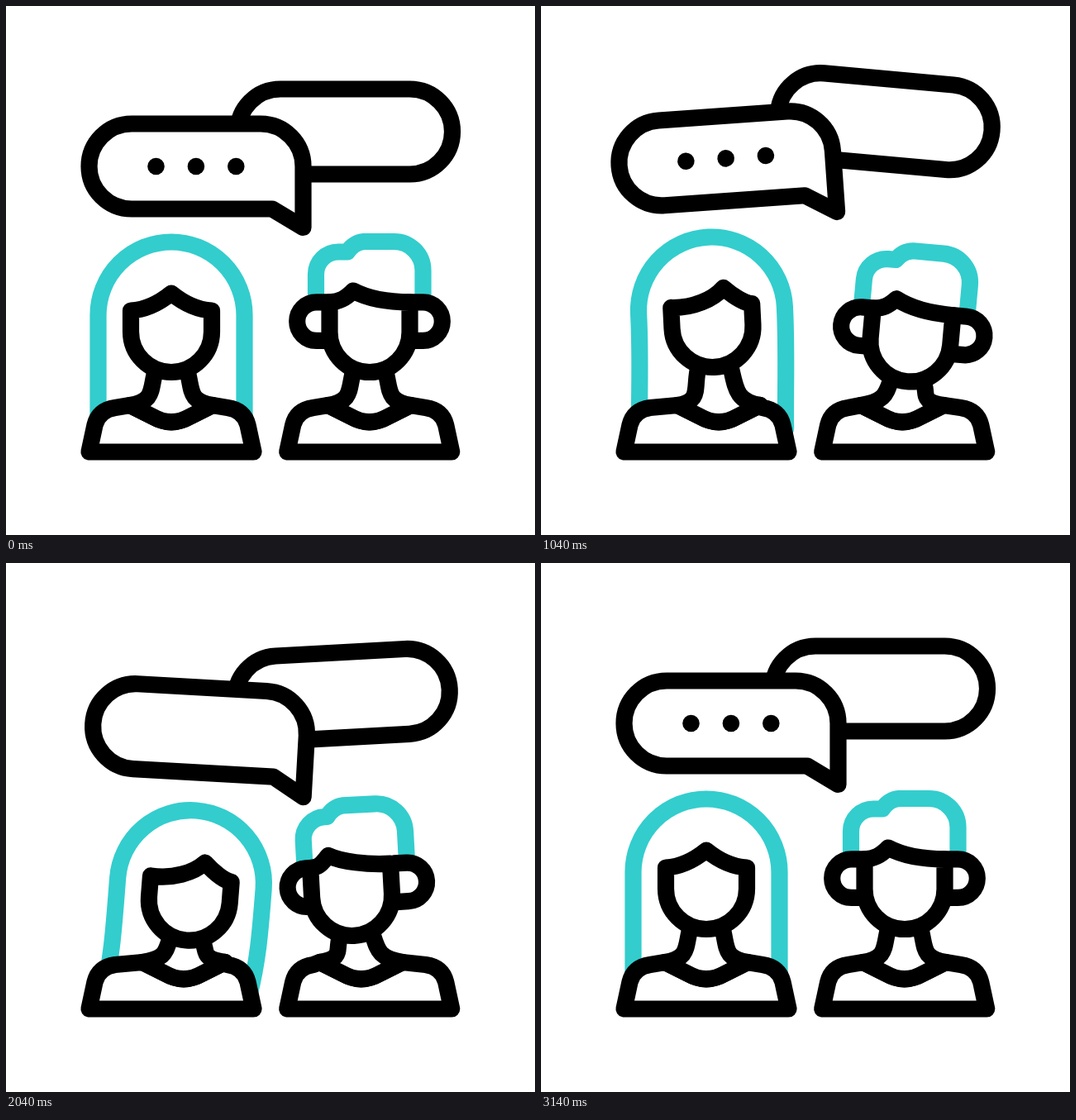
Recreate the animation shown at these times as an HTML page with a canvas. Size 640x640 px, loop 3.28 s.

```html
<!DOCTYPE html>
<html lang="en">
<head>
<meta charset="utf-8">
<title>Conversation</title>
<style>
html, body { margin: 0; width: 100%; height: 100%; overflow: hidden; background: #fff; }
canvas { display: block; width: 100%; height: 100%; }
</style>
</head>
<body>
<canvas id="stage" width="640" height="640"></canvas>
<script>
const ctx = document.getElementById('stage').getContext('2d');
const LOOP = 3280, STEP = 20, START = 220, END = 3140;
const TEAL = '#33cdcd', RAD = Math.PI / 180;

// Motion helpers: soft step, plateau, single bump, steady swing, blend.
const ease = (t, a, b) => (1 - Math.cos(Math.PI * Math.min(1, Math.max(0, (t - a) / (b - a))))) / 2;
const hold = (t, a, b, c, d) => ease(t, a, b) - ease(t, c, d);
const bump = (t, a, b, c) => hold(t, a, b, b, c);
const swing = (t, peak, period) => Math.cos(2 * Math.PI * (t - peak) / period);
const mix = (a, b, k) => a + (b - a) * k;

// She turns and talks, her bubble bobbing along; her hair ends trail behind.
function herPose(t) {
  const turn = hold(t, 260, 640, 2120, 2440);
  const tilt = hold(t, START, 640, 2150, 2600) * (0.3 + 4.4 * swing(t, 842, 418));
  const sway = turn * (12 + 16 * swing(t, 917, 418))
    - 30 * bump(t, START, 480, 720) - 40 * bump(t, 2150, 2360, 2600);
  return {
    turn, tilt, sway,
    deg: tilt + 1.2 * turn,
    dx: turn * (14.3 + tilt),
    dy: turn * (2 + 2 * tilt + 5 * ease(t, 1760, 2040))
  };
}

// He leans back, turns and nods, then leans back again and settles.
function hisPose(t) {
  const turn = hold(t, 960, 1200, 2150, 2420);
  const lean = 5.8 * ease(t, START, 1020) - 1.6 * ease(t, 1400, 1800) - 4.2 * ease(t, 2460, END);
  const nod = swing(t, 1812, 410);
  const tilt = mix(lean, 0.4 + 3.75 * nod, turn);
  return {
    turn, tilt,
    deg: tilt,
    dx: 1.1 * tilt - 8 * turn,
    dy: mix(0.45 * lean * lean, 2 * (1 - nod) ** 2, turn)
  };
}

function ink(path, color = '#000', fill = true) {
  if (fill) { ctx.fillStyle = '#fff'; ctx.fill(path); }
  ctx.strokeStyle = color;
  ctx.stroke(path);
}

function turned(deg, px, py, dx, dy, draw) {
  ctx.save();
  ctx.translate(px + dx, py + dy);
  ctx.rotate(deg * RAD);
  ctx.translate(-px, -py);
  draw();
  ctx.restore();
}

// Same move as turned(), for single points.
function mover(deg, px, py, dx, dy) {
  const c = Math.cos(deg * RAD), s = Math.sin(deg * RAD);
  return (x, y) => [px + dx + (x - px) * c - (y - py) * s, py + dy + (x - px) * s + (y - py) * c];
}

const backBubble = new Path2D('M332 100.5H488.5A51.5 51.5 0 0 1 488.5 203.5H332A51.5 51.5 0 0 1 332 100.5Z');
const frontBubble = new Path2D(
  'M152 142.5H308A51.5 51.5 0 0 1 359.5 194V268L322 245.5H152A51.5 51.5 0 0 1 152 142.5Z');

function dotCount(t) {
  const from = 500, cycle = 710;
  return t < from || t >= from + 3 * cycle ? 3 : Math.floor((t - from) % cycle / cycle * 4);
}

function bubbles(t, frontTilt, backTilt) {
  turned(backTilt, 550, 213, 0, 0, () => ink(backBubble));
  turned(frontTilt, 90, 278, 0, 0, () => {
    ink(frontBubble);
    ctx.fillStyle = '#000';
    for (let i = 0; i < dotCount(t); i++) {
      ctx.beginPath();
      ctx.arc(181.5 + i * 48.4, 194, 10.3, 0, 7);
      ctx.fill();
    }
  });
}

// The outer shoulders stay still; collar and neck follow the head.
function torso(cx, shift, move) {
  const mid = cx + shift;
  const [lx, ly] = move(cx - 19, 440), [rx, ry] = move(cx + 19, 440);
  const collar = p => {
    p.lineTo(mid + 50, 483);
    p.lineTo(mid + 22, 497);
    p.quadraticCurveTo(mid, 509.5, mid - 22, 497);
    p.lineTo(mid - 50, 483);
  };

  const body = new Path2D();
  body.moveTo(cx - 99.5, 539.5);
  body.lineTo(cx + 99.5, 539.5);
  body.lineTo(cx + 92.5, 507);
  body.quadraticCurveTo(cx + 88, 489, cx + 68, 486);
  collar(body);
  body.lineTo(cx - 68, 486);
  body.quadraticCurveTo(cx - 88, 489, cx - 92.5, 507);
  body.closePath();
  ink(body);

  const neck = new Path2D();
  neck.moveTo(lx, ly);
  neck.lineTo(rx, ry);
  neck.bezierCurveTo(rx + 7, mix(465, ry + 25, 0.4), mid + 20, 478, mid + 50, 483);
  collar(neck);
  neck.bezierCurveTo(mid - 20, 478, lx - 7, mix(465, ly + 25, 0.4), lx, ly);
  ink(neck);
}

function woman({ turn, sway, deg, dx, dy }) {
  const move = mover(deg, 200, 450, dx, dy);
  const hair = new Path2D(), endY = 515 + dy * 0.6;
  const [lx, ly] = move(111.5, 374), [l1x, l1y] = move(111.5, 430);
  const [rx, ry] = move(288.5, 374), [r1x, r1y] = move(288.5, 430);
  const [cx, cy] = move(200, 374);
  const le = 111.5 + sway, re = 288.5 + sway;
  hair.moveTo(le, endY);
  hair.bezierCurveTo(mix(lx, le, 0.4), endY - 42, l1x, l1y, lx, ly);
  hair.arc(cx, cy, 88.5, Math.PI + deg * RAD, 2 * Math.PI + deg * RAD);
  hair.lineTo(rx, ry);
  hair.bezierCurveTo(r1x, r1y, mix(rx, re, 0.4), endY - 42, re, endY);
  ink(hair, TEAL, false);

  torso(200, 15 * turn, move);
  turned(deg, 200, 450, dx, dy, () => {
    const face = new Path2D(), x = 200 + 15.5 * turn;
    face.moveTo(151, 368.5);
    face.bezierCurveTo(170 + 8 * turn, 367.5 + 3 * turn, x - 13, 358 + 3 * turn, x, 347.5);
    face.bezierCurveTo(x + 13 - 2 * turn, 358, 230 + 10 * turn, 367.5, 249, 368.5);
    face.lineTo(249, 394);
    face.arc(200, 394, 49, 0, Math.PI);
    face.closePath();
    ink(face);
  });
}

function man({ turn, deg, dx, dy }) {
  const sx = x => 440 + (x - 440) * (1 - 0.045 * turn);
  const move = mover(deg, 440, 450, dx, dy);

  torso(439.7, -10 * turn, (x, y) => move(x - 4 * turn, y));
  turned(deg, 440, 450, dx, dy, () => {
    const hair = new Path2D(), tuft = -6 * turn;
    hair.moveTo(sx(375), 352);
    hair.arcTo(sx(375), 297.5, sx(413) + tuft, 297.5, 27);
    hair.lineTo(sx(413) + tuft, 297.5);
    hair.quadraticCurveTo(sx(421) + tuft, 286, sx(433) + tuft, 285);
    hair.arcTo(sx(504.5), 285, sx(504.5), 352, 35);
    hair.lineTo(sx(504.5), 352);
    ink(hair, TEAL, false);

    for (const side of [-1, 1]) {
      const ear = new Path2D(), x = 440 + side * (64.5 - 3.5 * turn);
      ear.moveTo(440 + side * 46, 358.3);
      ear.lineTo(x, 358.3);
      ear.arc(x, 381.6, 23.3, -Math.PI / 2, Math.PI / 2, side < 0);
      ear.lineTo(440 + side * 42, 405);
      ink(ear);
    }

    const f = -7 * turn, peak = 420 - 13 * turn, face = new Path2D();
    face.moveTo(391.5 + f, 358.3);
    face.bezierCurveTo(403 + f, 358, peak - 9, 354, peak, 344.5);
    face.bezierCurveTo(peak + 16, 353, 460 + f, 358.3, 488.5 + f, 358.3);
    face.lineTo(488.5 + f, 394.5);
    face.arc(440 + f, 394.5, 48.5, 0, Math.PI);
    face.closePath();
    ink(face);
  });
}

function frame() {
  const t = Math.floor(performance.now() % LOOP / STEP) * STEP;
  const her = herPose(t), his = hisPose(t);
  ctx.fillStyle = '#fff';
  ctx.fillRect(0, 0, 640, 640);
  ctx.lineWidth = 20.2;
  ctx.lineCap = ctx.lineJoin = 'round';
  woman(her);
  man(his);
  bubbles(t, her.tilt, his.tilt);
  requestAnimationFrame(frame);
}
frame();
</script>
</body>
</html>
```
